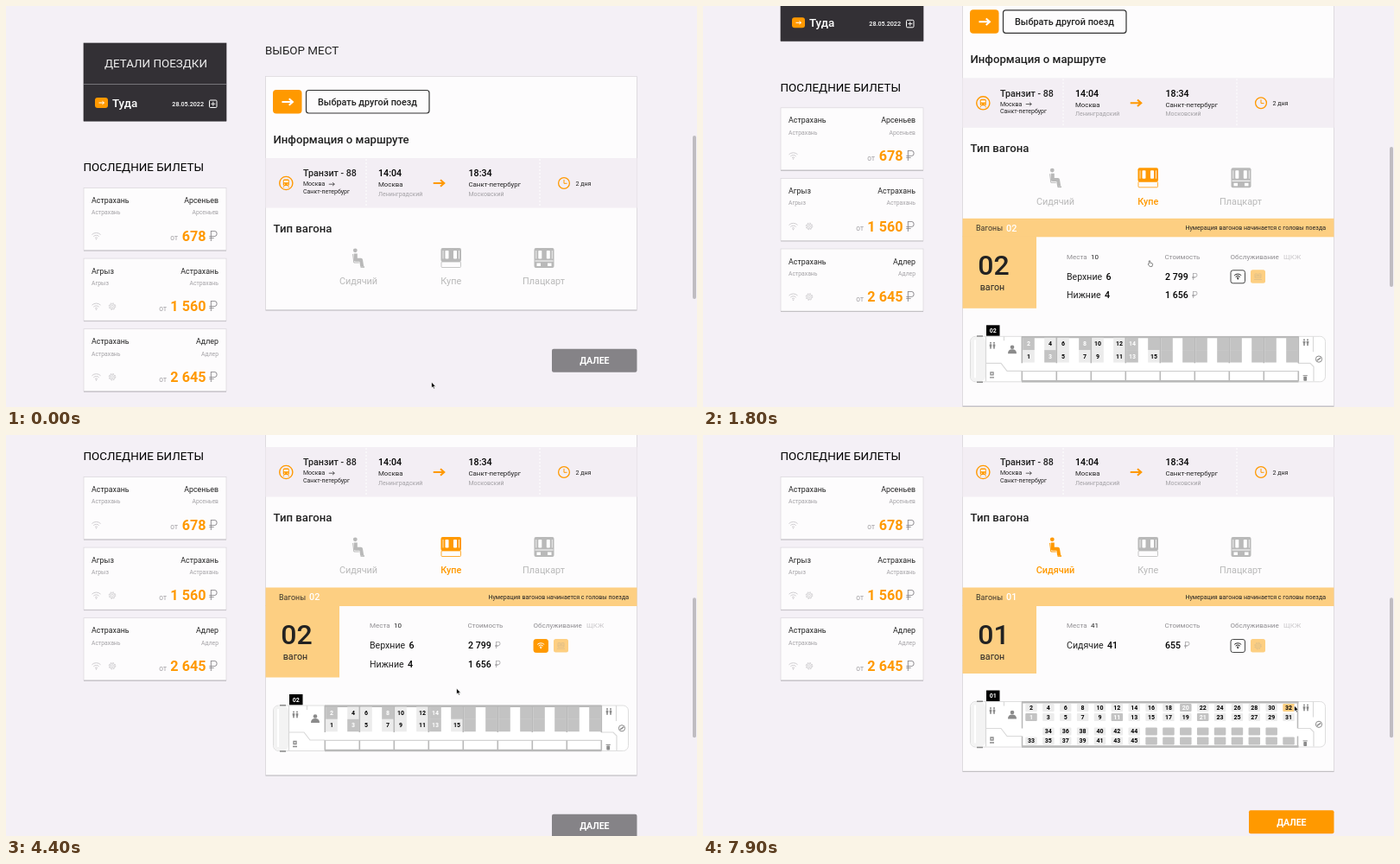
These frames come from a looping animation (800x464 px, 8 s). An HTML page:

```html
<!DOCTYPE html>
<html lang="ru">
<head>
<meta charset="utf-8">
<style>
html, body { margin: 0; width: 100%; height: 100%; overflow: hidden; background: #f4f0f6; }
svg { display: block; width: 100%; height: 100%; font-family: Roboto, Arial, sans-serif; }
text { white-space: pre; }
</style>
</head>
<body>
<svg viewBox="0 0 800 464">
  <g id="page"></g>
  <rect id="thumb" x="795" width="4" rx="2" fill="#bfbcc1"/>
  <g id="cursor" stroke-width=".7" stroke-linejoin="round">
    <path id="arrow" d="M0 0V7L1.6 5.6L2.7 8L3.9 7.4L2.8 5.2H5Z" fill="#000" stroke="#fff"/>
    <path id="hand" transform="scale(.75)" d="M-1 0Q0-1 1 0V3L4.2 3.6Q5 4 4.8 5.5L4 8.5H.2L-2.2 5.4Q-2.4 4-1 4.6Z" fill="#fff" stroke="#222"/>
  </g>
</svg>
<script>
const LOOP = 8000;
const ORANGE = '#ff9900', LIGHT = '#fdcf82', GREY = '#b9b9b9', MUTED = '#a3a1a5', INK = '#222';
const $ = id => document.getElementById(id);
const times = (n, f) => Array.from({ length: n }, (_, i) => f(i)).join('');

// cy is the middle of the capital letters
const text = (x, cy, s, size, fill = INK, weight = 400, anchor = 'start') =>
  `<text x="${x}" y="${cy + size * 0.355}" font-size="${size}" fill="${fill}" font-weight="${weight}" text-anchor="${anchor}">${s}</text>`;
const mid = (x, cy, s, size, fill, weight) => text(x, cy, s, size, fill, weight, 'middle');
const end = (x, cy, s, size, fill, weight) => text(x, cy, s, size, fill, weight, 'end');
const rect = (x, y, w, h, fill, r = 0, extra = '') =>
  `<rect x="${x}" y="${y}" width="${w}" height="${h}" rx="${r}" fill="${fill}" ${extra}/>`;
const frame = (x, y, w, h, c, r = 0, sw = 1) => rect(x, y, w, h, 'none', r, `stroke="${c}" stroke-width="${sw}"`);
const line = (d, c, w = 1, extra = '') => `<path d="${d}" fill="none" stroke="${c}" stroke-width="${w}" ${extra}/>`;
const dot = (x, y, r, fill) => `<circle cx="${x}" cy="${y}" r="${r}" fill="${fill}"/>`;
const ring = (x, y, r, c, w = 1) => `<circle cx="${x}" cy="${y}" r="${r}" fill="none" stroke="${c}" stroke-width="${w}"/>`;
const move = (x, y, s, k = 1) => `<g transform="translate(${x} ${y}) scale(${k})">${s}</g>`;

const card = (x, y, w, h, fill, edge = '#d9d6db') =>
  rect(x, y + 1, w, h, '#b5b3b7') + rect(x, y, w, h, fill, 0, `stroke="${edge}" stroke-width=".7"`);
const arrow = (x, y, len, c, w) =>
  line(`M${x - len / 2} ${y}h${len}m${-len * .34} ${-len * .3}l${len * .34} ${len * .3}l${-len * .34} ${len * .3}`, c, w);
const wifi = (x, y, c, k = 1) => move(x, y,
  line('M-5-1.5a7.2 7.2 0 0 1 10 0M-3.2.6a4.6 4.6 0 0 1 6.4 0M-1.5 2.4a2.2 2.2 0 0 1 3 0', c, 1 / k) + dot(0, 3.7, .8 / k, c), k);
const gear = (x, y, c) => ring(x, y, 1.4, c, .8) + ring(x, y, 3, c, .8) +
  `<circle cx="${x}" cy="${y}" r="3.8" fill="none" stroke="${c}" stroke-dasharray="1.5"/>`;
const linen = (x, y, c) => line(`M${x - 4.5} ${y + 3.2}h9m-8-2h7v-2h-7zm0-2v-2.5h2.8v2.5m1.4 0v-2.5h2.8v2.5`, c, .9);
const person = (x, y, c) => dot(x, y - 3, 1, c) + rect(x - 1.3, y - 1.6, 2.6, 3, c, .6) + rect(x - .8, y + 1, 1.6, 2.8, c);

function ticket(i, from, to, price) {
  return move(0, i * 81.6,
    card(90, 210.5, 165, 72, '#fdfcfd') +
    text(99, 225, from, 8.9) + end(246, 225, to, 8.9) +
    text(99, 239, from, 6.8, MUTED) + end(246, 239, to, 6.8, MUTED) +
    wifi(104.5, 266, '#cfcdd0') + (i ? gear(123, 266, '#cfcdd0') : '') +
    end(231.5, 266, price, 16.2, ORANGE, 700) + text(235, 266, '₽', 16, '#8d8b8f', 300) +
    end(price.length > 3 ? 186 : 199, 268.5, 'от', 8.3, MUTED));
}

const sidebar = () =>
  card(90, 43, 165, 90, '#333035', '#333035') + line('M90 90.5H255', '#8a878c', .8) +
  mid(173.5, 66.5, 'ДЕТАЛИ ПОЕЗДКИ', 13.4, '#eee') +
  rect(103, 106, 15, 12, ORANGE, 3) + arrow(110.5, 112, 6, '#fff', 1) +
  text(123, 112, 'Туда', 13.4, '#fff', 500) + end(229, 113.5, '28.05.2022', 7.2, '#fff', 500) +
  frame(235.5, 109, 8.5, 8.5, '#fff', 1.2) + line('M237.3 113.25h5m-2.5-2.5v5', '#fff', .9) +
  text(89.5, 186.5, 'ПОСЛЕДНИЕ БИЛЕТЫ', 13.4, '#000') +
  ticket(0, 'Астрахань', 'Арсеньев', '678') +
  ticket(1, 'Агрыз', 'Астрахань', '1 560') +
  ticket(2, 'Астрахань', 'Адлер', '2 645');

const route = () =>
  rect(309, 97, 33.5, 27.5, ORANGE, 4) + arrow(325.7, 111, 12.5, '#fff', 2) +
  frame(347.5, 97.5, 142.5, 26.5, '#333', 3, 1.2) + mid(418.5, 111, 'Выбрать другой поезд', 10.8, INK, 500) +
  text(309.5, 154.5, 'Информация о маршруте', 13.15, INK, 500) +
  rect(300.5, 176, 430, 57.5, '#f3eef4') +
  line('M417 177V233M618 177V233', '#fff', 1, 'stroke-dasharray="2 2"') +
  ring(324.3, 205, 7.6, ORANGE, 1.4) + rect(320.8, 200.5, 7, 7.5, ORANGE, 1.5) +
  rect(321.8, 202, 5, 2.2, '#fff') + dot(322.6, 206.2, .6, '#fff') + dot(326, 206.2, .6, '#fff') +
  line('M322 208.3l-1 1.7m5.6-1.7l1 1.7', ORANGE) +
  text(344, 193.5, 'Транзит - 88', 10.7, INK, 500) +
  text(344, 206, 'Москва', 7) + arrow(377, 206.2, 6.5, INK, .7) + text(344, 214.5, 'Санкт-петербург', 7) +
  text(431, 193.5, '14:04', 10.7, '#000', 500) + text(431, 206.5, 'Москва', 7.85) +
  text(431, 217.5, 'Ленинградский', 7, MUTED) +
  arrow(501, 205, 12.5, ORANGE, 2.1) +
  text(535.5, 193.5, '18:34', 10.7, '#000', 500) + text(535.5, 206.5, 'Санкт-петербург', 7.85) +
  text(535.5, 217.5, 'Московский', 7, MUTED) +
  ring(646, 205, 6.4, ORANGE, 1.3) + line('M646 201v4.3h3.5', ORANGE, 1) +
  text(659.5, 205, '2 дня', 7.1);

const windows = x => rect(x + 5, 283, 4, 9.5, '#fff', .8) + rect(x + 14.5, 283, 4, 9.5, '#fff', .8) +
  line(`M${x + 2.5} 283v9.5m18.5 0v-9.5`, '#fff', .8);

function types(s) {
  const shade = on => on ? ORANGE : GREY, sit = shade(s.sit), coupe = shade(s.coupe);
  const label = (x, name, on) => mid(x, 318.5, name, 10.85, shade(on), on ? 500 : 400);
  return text(309.5, 257, 'Тип вагона', 13.15, INK, 500) +
    dot(404.3, 282.8, 2.4, sit) +
    line('M404.8 286.5v7.3h6.2l1.2 7.5', sit, 4, 'stroke-linejoin="round"') +
    line('M401.6 287l1.2 10h6', sit, 1) + line('M410.5 302h4.5', sit, 1.6) +
    rect(503.5, 280, 23.5, 16, coupe, 2) + windows(503.5) + frame(504, 296, 22.5, 6.5, coupe, 1, .8) +
    rect(611.5, 280, 23, 23, GREY, 2) + windows(611.3) +
    rect(612.5, 294.5, 21, 1, '#fff') + rect(614.5, 297.5, 4.5, 3.5, '#fff') + rect(627, 297.5, 4.5, 3.5, '#fff') +
    label(408, 'Сидячий', s.sit) + label(515.3, 'Купе', s.coupe) + label(622.5, 'Плацкарт', false);
}

function seat(x, y, n, w, h, s, taken) {
  const off = !n || taken.includes(n);
  const fill = n && n === s.seat ? LIGHT : off ? '#c3c3c3' : '#ececec';
  return rect(x - w / 2, y - h / 2, w, h, fill, h < 10 ? 1 : 0) +
    (n ? mid(x, y, n, 7, off ? '#fff' : '#000', 700) : '');
}

function coupeSeats(s) {
  const taken = [2, 3, 8, 13, 14];
  return times(16, i => {
    const x = 377 + (i >> 1) * 40 + (i % 2) * 25;
    return seat(x, 321.7, i < 7 ? 2 * i + 2 : 0, 13.6, 14.4, s, taken) +
      seat(x, 336, i < 8 ? 2 * i + 1 : 0, 13.6, 14.4, s, taken);
  }) + times(9, i => line(`M${369.3 + i * 40} 313V344M${369.3 + i * 40} 353V365`, GREY, 1.6)) +
    line('M369 353.3H689', '#c9c9c9', 1);
}

function sitSeats(s) {
  const taken = [1, 11, 20, 21];
  const put = (i, y, n) => seat(380 + i * 19.87, y, n, 13.5, 9, s, taken);
  return times(16, i =>
    put(i, 320, 2 * i + 2) + put(i, 331, 2 * i + 1) +
    (i && i < 15 ? put(i, 347.5, i < 7 ? 32 + 2 * i : 0) : '') +
    put(i, 358.5, i < 7 ? 33 + 2 * i : 0)) +
    line('M369.5 313V344M688.5 313V344M369.5 353V365M688.5 353V365', GREY, 1.5);
}

function wagon(s) {
  const c = '#8b8b8b';
  return rect(328, 300, 15.5, 12.5, '#000') + mid(335.7, 306.3, s.car, 7, '#fff', 700) +
    rect(309.5, 313, 411, 52.5, '#fff', 6, 'stroke="#dedede"') +
    rect(310, 313.5, 17, 51.5, '#f3f3f3', 6) + line('M315 317V361', '#fff', 2) +
    line('M327.5 313V365M348.5 313V318M327.5 344H345L352 353H369M689 344H703L707 348V365M706.5 313V331', '#d9d9d9', 1.2) +
    line('M317 312.7h7M317 366h7', c, 1.6) +
    line('M369 313.8H689.5M369 365H689.5', GREY, 2.4) +
    (s.car === '02' ? coupeSeats(s) : sitSeats(s)) +
    person(333, 323.5, c) + person(337, 323.5, c) + person(696, 320, c) + person(700, 320, c) +
    dot(358, 325.5, 2.3, c) + `<path d="M353 333q0-5 5-5t5 5z" fill="${c}"/>` +
    line('M332 360.5h5m-4-3h3v-3h-3z', c, 1.3) +
    ring(713, 339.3, 3.6, c, 1) + line('M710.8 340.8l4.4-3', c, 1.4) +
    rect(695.3, 359.5, 3.8, 5, c, .8) + line('M694.6 358.4h5.2', c, 1);
}

function details(s) {
  const coupe = s.car === '02';
  const row = (y, name, x, n, price) =>
    text(421, y, name, 10.6) + text(x, y, n, 10.7, '#000', 500) +
    text(535, y, price, 10.6, '#000', 500) + text(price.length > 3 ? 566 : 557, y, '₽', 10.6, '#8d8b8f', 300);
  return rect(300.5, 176.5, 430, 21.5, LIGHT) +
    text(316, 188, 'Вагоны', 8.9, '#3a352c') + text(351, 187.5, s.car, 10.8, '#fff', 500) +
    end(721, 187.5, 'Нумерация вагонов начинается с головы поезда', 7.05) +
    rect(300.5, 197, 85.5, coupe ? 83.5 : 79, LIGHT) +
    mid(336.5, 230.5, s.car, 32, INK, 500) + mid(335, 256, 'вагон', 10.7, INK) +
    text(421, 220.5, 'Места', 8, '#8f8d91') + text(449, 220.5, coupe ? '10' : '41', 8) +
    text(534.5, 220.5, 'Стоимость', 8, '#8f8d91') + text(610.5, 220.5, 'Обслуживание', 8.1, '#8f8d91') +
    text(672, 220.5, 'ЩКЖ', 8, '#c9c7ca') +
    (coupe ? row(243.5, 'Верхние', 466.5, '6', '2 799') + row(265, 'Нижние', 465, '4', '1 656')
      : row(243.5, 'Сидячие', 468, '41', '655')) +
    rect(611, 236.5, 16.5, 15, s.wifi ? ORANGE : '#fff', 2.5, `stroke="${s.wifi ? ORANGE : '#333'}" stroke-width=".9"`) +
    wifi(619.2, 243.6, s.wifi ? '#fff' : INK, .8) +
    rect(634, 236, 17, 15.5, LIGHT, 2.5) + (coupe ? linen : gear)(642.5, 244, '#dfbf8a') +
    move(0, coupe ? 0 : -4.5, wagon(s));
}

function page(s) {
  const bottom = s.car === '02' ? 556 : s.car ? 551.5 : 352;
  return sidebar() + text(300, 51, 'ВЫБОР МЕСТ', 13.4) +
    card(300.5, 81.5, 430, bottom - 82, '#fdfcfd') + route() + types(s) +
    (s.car ? move(0, 162, details(s)) : '') +
    rect(632, bottom + 44.8, 98.5, 27, s.seat ? ORANGE : '#858387', 2) +
    mid(681.3, bottom + 58.3, 'ДАЛЕЕ', 10.5, '#fff', 700);
}

// interpolates [time, ...values] keys
function track(keys, t) {
  const i = keys.findIndex(k => k[0] > t);
  if (i < 0) return keys.at(-1).slice(1);
  const a = keys[i - 1], b = keys[i], k = (t - a[0]) / (b[0] - a[0]);
  return a.slice(1).map((v, j) => v + (b[j + 1] - v) * k);
}
const SCROLL = [[0, 0], [1600, 0], [1700, 2], [1800, 92], [1900, 162]];
const PATH = [[0, 492.5, 435], [100, 492.5, 435], [350, 508, 350], [600, 517, 295], [2600, 517, 295],
  [3200, 618, 242], [3800, 618, 242], [4300, 521.5, 293], [4500, 521.5, 293], [5000, 457, 320],
  [5500, 457, 320], [6200, 419, 145], [6800, 419, 145], [7500, 679, 312], [7800, 679, 312], [7900, 684.5, 313]];
const HAND = [[500, 2000], [3100, 3900], [4900, 5550], [6100, 6850], [7400, 7900]];

const stateAt = t => ({
  car: t < 1500 ? '' : t < 6600 ? '02' : '01',
  sit: t >= 6100,
  coupe: t >= 500 && t < 6600,
  wifi: t >= 3400 && t < 6600,
  seat: t >= 5200 && t < 6600 ? 10 : t >= 7600 ? 32 : 0
});

let shown = '';
function draw(now) {
  const t = now % LOOP, s = stateAt(t), key = JSON.stringify(s);
  if (key !== shown) {
    $('page').innerHTML = page(s);
    shown = key;
  }
  const [y] = track(SCROLL, t), [cx, cy] = track(PATH, t);
  $('page').setAttribute('transform', `translate(0 ${-y})`);
  $('thumb').setAttribute('y', s.car ? 129.5 + y * 0.3625 : 150);
  $('thumb').setAttribute('height', s.car ? 162 : 189);
  $('cursor').setAttribute('transform', `translate(${cx} ${cy})`);
  const hand = HAND.some(([a, b]) => t >= a && t < b);
  $('hand').style.display = hand ? '' : 'none';
  $('arrow').style.display = hand ? 'none' : '';
}
const start = performance.now();
function tick() {
  draw(performance.now() - start);
  requestAnimationFrame(tick);
}
tick();
</script>
</body>
</html>
```
